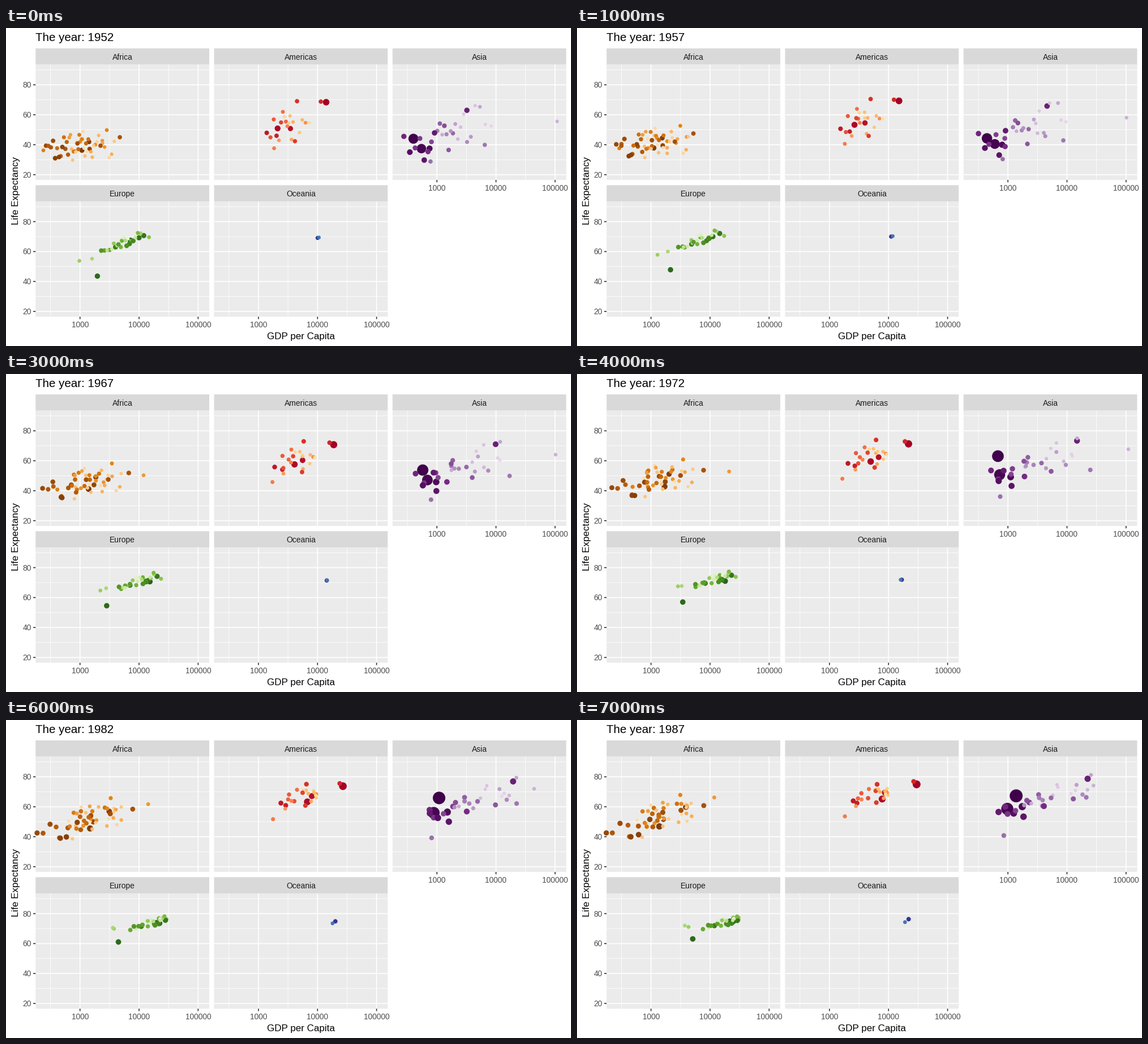
A matplotlib script that plays this animation: 998x561 px, repeating every 8 s.

```python
import numpy as np
import matplotlib.pyplot as plt
from matplotlib.animation import FuncAnimation
from matplotlib.colors import to_rgb
from matplotlib.patches import Rectangle

W, H, DPI = 998, 561, 100
PT = 72 / DPI  # points per pixel
YEARS = range(1952, 1992, 5)
T = np.linspace(0, 1, len(YEARS))
KEY_YEARS = (1952, 1962, 1972, 1987)

PANEL_W, PANEL_H, STRIP_H = 306.73, 203.4, 28.6
LEFT, TOP, STEP_X, STEP_Y = 52.3, 64.6, 315.23, 241.3
DECADE, YEAR_PX = 104.32, PANEL_H / 77
MAX_POP = 1318.7  # millions

plt.rcParams["font.family"] = "Liberation Sans"
fig = plt.figure(figsize=(W / DPI, H / DPI), dpi=DPI, facecolor="white")
ax = fig.add_axes([0, 0, 1, 1])
ax.set(xlim=(0, W), ylim=(H, 0))
ax.axis("off")


def text(x, y, s, px, color="black", ha="center", **kw):
    return ax.text(x, y, s, fontsize=px * PT, color=color, ha=ha,
                   va="baseline", **kw)


def line(xs, ys, px, color="white"):
    ax.plot(xs, ys, color=color, lw=px * PT, solid_capstyle="butt",
            snap=False, zorder=1)


def box(x, y, w, h, color):
    ax.add_patch(Rectangle((x, y), w, h, fc=color, ec="none", snap=False, zorder=0))


def blend(ends, bend=1):
    """Value over the years, easing out from the first end to the second."""
    return ends[0] + (ends[1] - ends[0]) * (1 - (1 - T) ** bend)


def scatter_scores(rng, n):
    """Evenly spread, centre-heavy scores of unit deviation in random order."""
    s = np.linspace(-1, 1, n)
    return rng.permutation(1.2 * s + 0.8 * s ** 3)[:, None]


class Panel:
    """One facet with its background, axes and moving bubbles."""

    def __init__(self, name, col, row, ramp, growth):
        self.x = LEFT + col * STEP_X
        self.y = TOP + row * STEP_Y
        self.ramp = [to_rgb("#" + c) for c in ramp.split()]
        self.growth = growth  # share of the final population at the start
        self.rows = []
        self.draw_frame(name, col == 0, (col, row) in ((0, 1), (1, 1), (2, 0)))

    def px(self, log_gdp):
        return self.x + (log_gdp - 2.2483) * DECADE

    def py(self, life):
        return self.y + (93.5 - life) * YEAR_PX

    def draw_frame(self, name, y_axis, x_axis):
        right, bottom = self.x + PANEL_W, self.y + PANEL_H
        box(self.x, self.y - STRIP_H, PANEL_W, STRIP_H, "#D9D9D9")
        box(self.x, self.y, PANEL_W, PANEL_H, "#EBEBEB")
        text(self.x + PANEL_W / 2, self.y - 9, name, 13.9, "#1A1A1A")
        for shift, low, width in ((0.5, 30, 0.82), (0, 20, 1.65)):
            for g in (3, 4, 5):
                line([self.px(g - shift)] * 2, [self.y, bottom], width)
            for v in range(low, 91, 20):
                line([self.x, right], [self.py(v)] * 2, width)
        if y_axis:
            for v in (20, 40, 60, 80):
                line([self.x - 4.25, self.x], [self.py(v)] * 2, 1.65, "#333333")
                text(self.x - 7.4, self.py(v) + 5, str(v), 13.7, "#4D4D4D", "right")
        if x_axis:
            for g in (3, 4, 5):
                line([self.px(g)] * 2, [bottom, bottom + 4.25], 1.65, "#333333")
                text(self.px(g), bottom + 18.7, str(10 ** g), 13.7, "#4D4D4D")

    def add(self, pop, log_gdp, life):
        root = np.sqrt(pop / MAX_POP) * blend((self.growth ** 0.5, 1), 1) ** 0.8
        self.rows.append((pop, self.px(log_gdp), self.py(life),
                          ((5.8 + 17.07 * root) * PT) ** 2))

    def landmark(self, pop, gdp, life):
        """A bubble that stands out, led through the key years."""
        self.add(pop, np.interp(YEARS, KEY_YEARS, np.log10(gdp)),
                 np.interp(YEARS, KEY_YEARS, life))

    def cloud(self, n, seed, income, spread, life, slope, noise, bends, top, lean):
        """Bubbles around a rising trend; lean > 0 makes the small ones richer."""
        rng = np.random.default_rng(seed)
        wealth, drift, error = (scatter_scores(rng, n) for _ in range(3))
        place = np.cos(0.6 * T) * wealth + np.sin(0.6 * T) * drift
        offset = blend(spread) * place
        log_gdp = blend(income, bends[0]) + offset
        age = blend(life, bends[1]) + blend(slope) * offset + blend(noise) * error
        order = np.argsort(np.argsort(lean * wealth[:, 0] + rng.normal(size=n)))
        for rank, g, v in zip(order, log_gdp, age):
            self.add(top * (1 - rank / n) ** 3, g, v)

    def build(self):
        pops, xs, ys, sizes = zip(*self.rows)
        self.xy = np.stack([xs, ys], axis=-1)
        self.sizes = np.array(sizes)
        # The most populous country takes the darkest shade.
        rank = np.argsort(np.argsort(-np.array(pops))) / (len(pops) - 1)
        stops = np.linspace(0, 1, len(self.ramp))
        shades = [np.interp(rank, stops, c) for c in zip(*self.ramp)]
        self.dots = ax.scatter(self.xy[:, 0, 0], self.xy[:, 0, 1], s=self.sizes[:, 0],
                               c=np.stack(shades, axis=-1), linewidths=0, zorder=2)

    def show(self, i):
        self.dots.set_offsets(self.xy[:, i])
        self.dots.set_sizes(self.sizes[:, i])


africa = Panel("Africa", 0, 0, "7F3B08 B35806 E08214 FDB863 FEE0B6", 0.28)
africa.landmark(135, (1077, 1151, 1698, 1385), (36.3, 39.4, 42.8, 46.9))
africa.landmark(80, (1419, 1693, 2024, 3885), (41.9, 47, 51.1, 59.8))
africa.landmark(44, (4725, 5769, 7766, 7826), (45, 50, 53.7, 60.8))
africa.landmark(6, (2388, 6757, 21011, 11771), (42.7, 47.8, 52.8, 66.2))
africa.cloud(48, 4, income=(2.98, 3.12), spread=(0.30, 0.33), life=(39, 53),
             slope=(4, 15), noise=(4.8, 5), bends=(2.5, 1.05), top=75, lean=0.2)

americas = Panel("Americas", 1, 0, "A50026 D73027 F46D43 FDAE61 FEE090", 0.42)
americas.landmark(301, (13990, 16173, 21806, 29884), (68.4, 70.2, 71.3, 75))
americas.landmark(33, (11367, 13462, 18971, 26627), (68.8, 71.3, 72.9, 76.9))
americas.landmark(190, (2109, 3337, 4986, 7807), (50.9, 55.7, 59.5, 65.2))
americas.landmark(109, (3478, 4582, 6809, 8688), (50.8, 58.3, 62.4, 69.5))
americas.landmark(8.5, (1840, 1797, 1654, 1823), (37.6, 43.6, 48, 53.6))
americas.cloud(20, 7, income=(3.50, 3.74), spread=(0.18, 0.20), life=(53, 68),
               slope=(20, 15), noise=(6.5, 3), bends=(1.6, 1.3), top=44, lean=0.7)

asia = Panel("Asia", 2, 0, "40004B 762A83 9970AB C2A5CF E7D4E8", 0.4)
asia.landmark(1318, (400, 488, 677, 1379), (44, 44.5, 63.1, 67.3))
asia.landmark(1110, (547, 658, 724, 977), (37.4, 43.6, 50.7, 58.6))
asia.landmark(224, (750, 849, 1111, 1748), (37.5, 42.5, 49.2, 60.1))
asia.landmark(127, (3217, 6577, 14779, 22376), (63, 68.7, 73.4, 78.7))
asia.landmark(32, (779, 853, 740, 852), (28.8, 32, 36.1, 40.8))
asia.landmark(28, (6460, 11627, 24837, 21198), (39.9, 45.9, 53.9, 66.3))
asia.landmark(2.5, (108382, 95458, 109348, 28118), (55.6, 60.5, 67.7, 74.2))
asia.cloud(26, 11, income=(3.18, 3.62), spread=(0.37, 0.48), life=(47.5, 65),
           slope=(12, 13), noise=(6.5, 3.5), bends=(1.2, 1.05), top=170, lean=1.2)

europe = Panel("Europe", 0, 1, "276419 4D9221 7FBC41 B8E186 E6F5D0", 0.8)
europe.landmark(71, (1969, 2323, 3451, 5089), (43.6, 52.1, 57, 63.1))
europe.landmark(82, (7144, 12902, 18016, 24639), (67.5, 70.3, 71, 74.8))
europe.landmark(61, (9980, 12477, 15895, 21665), (69.2, 70.8, 72, 75))
europe.landmark(7.5, (14734, 20431, 27195, 30282), (69.6, 71.3, 73.8, 77.4))
europe.landmark(4.5, (974, 1710, 2860, 4314), (53.8, 61.9, 67.5, 71.1))
europe.landmark(3.6, (1601, 2313, 3313, 3739), (55.2, 64.8, 67.7, 72))
europe.cloud(24, 5, income=(3.72, 4.22), spread=(0.18, 0.16), life=(65.8, 74),
             slope=(18, 11), noise=(1.6, 1.2), bends=(1.35, 1.7), top=60, lean=0)

oceania = Panel("Oceania", 1, 1, "313695 4575B4", 0.45)
oceania.landmark(20, (10040, 12217, 16789, 21889), (69.1, 70.9, 71.9, 76.3))
oceania.landmark(4, (10557, 13176, 16046, 19007), (69.4, 71.2, 71.9, 74.3))

panels = (africa, americas, asia, europe, oceania)
for p in panels:
    p.build()

title = text(LEFT, 23.3, "", 20.5, ha="left")
text(520.9, 548.6, "GDP per Capita", 17)
text(21.8, 286.5, "Life Expectancy", 17, rotation=90, rotation_mode="anchor")


def draw(i):
    title.set_text(f"The year: {YEARS[i]}")
    for p in panels:
        p.show(i)
    return [title] + [p.dots for p in panels]


anim = FuncAnimation(fig, draw, frames=len(YEARS), interval=1000, repeat=True)
plt.show()
```
